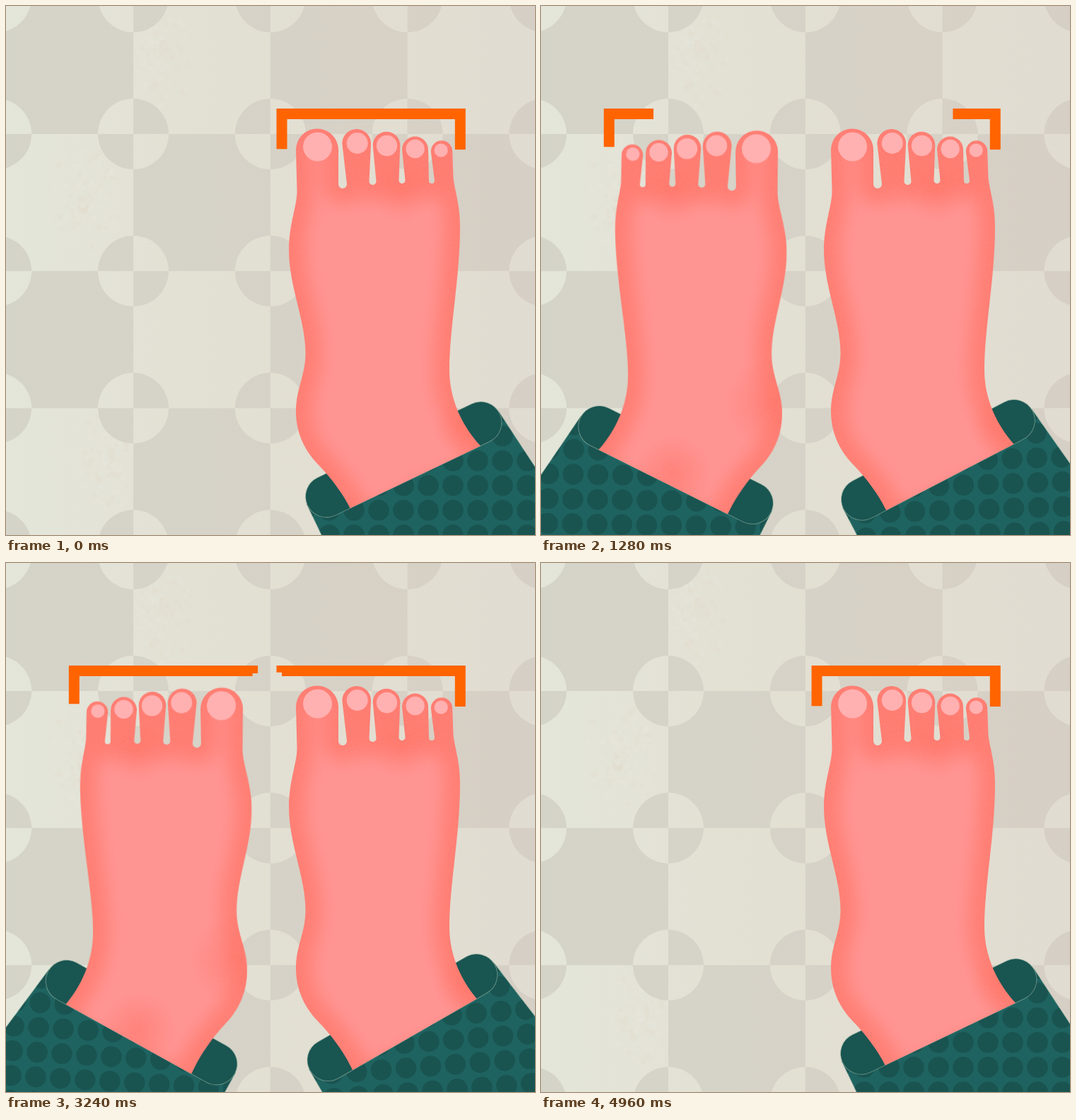
These frames come from a looping animation (748x748 px, 5 s). An HTML page with a canvas:

```html
<!DOCTYPE html>
<html lang="en">
<head>
<meta charset="utf-8">
<title>Two feet</title>
<style>
  html, body { margin: 0; width: 100%; height: 100%; overflow: hidden; background: #e2ded2; }
  canvas { display: block; }
</style>
</head>
<body>
<canvas id="stage" width="748" height="748"></canvas>
<script>
const SIZE = 748, LOOP = 5000, STEP = 40, TAU = Math.PI * 2;
const ctx = document.getElementById('stage').getContext('2d');
const rad = deg => deg * Math.PI / 180;

// Smooth progress of t from start to end, 0 to 1
const ease = (t, start, end) => {
  const u = Math.min(1, Math.max(0, (t - start) / (end - start)));
  return u * u * (3 - 2 * u);
};

let seed = 7;
const random = () => (seed = (seed * 16807) % 2147483647) / 2147483647;

function layer() {
  const canvas = document.createElement('canvas');
  canvas.width = canvas.height = SIZE;
  return canvas;
}

function disc(c, x, y, r) {
  c.beginPath();
  c.arc(x, y, r, 0, TAU);
  c.fill();
}

function makeFloor() {
  const canvas = layer(), c = canvas.getContext('2d');
  const across = colors => {
    const g = c.createLinearGradient(0, 0, SIZE, 0);
    colors.forEach((color, i) => g.addColorStop(i / (colors.length - 1), color));
    return g;
  };
  const light = across(['#e4e6da', '#e3e0d4', '#e2ded2', '#e1dcd1']);
  const dark = across(['#d5d4c8', '#d6d3c8', '#d7d1c6', '#d6cfc5']);
  const cell = 193.8, x0 = -13.8, y0 = -12.8;

  c.fillStyle = light;
  c.fillRect(0, 0, SIZE, SIZE);
  for (const [cx, cy] of [[110, 285], [215, 60], [150, 640]]) {
    for (let i = 0; i < 160; i++) {
      const a = random() * TAU, d = random() * 85;
      c.fillStyle = random() < 0.5 ? 'rgba(226,221,207,.35)' : 'rgba(229,231,219,.4)';
      disc(c, cx + Math.cos(a) * d * 0.7, cy + Math.sin(a) * d, 1 + random() * 4);
    }
  }
  c.fillStyle = dark;
  for (let i = 0; i < 4; i++) {
    for (let j = 0; j < 4; j++) {
      if ((i + j) % 2 === 1) continue;
    }
  }
  const isDark = (i, j) => (i + j) % 2 === 0;
  for (let i = 0; i < 5; i++) {
    for (let j = 0; j < 5; j++) {
      if (isDark(i, j)) c.fillRect(x0 + i * cell, y0 + j * cell, cell, cell);
    }
  }
  // Quarter discs at the corners swap the two tones
  for (let i = 0; i < 5; i++) {
    for (let j = 0; j < 5; j++) {
      const x = x0 + i * cell, y = y0 + j * cell;
      for (let q = 0; q < 4; q++) {
        const right = q === 0 || q === 3, below = q < 2;
        c.fillStyle = isDark(i + (right ? 2 : 1), j + (below ? 2 : 1)) ? light : dark;
        c.beginPath();
        c.moveTo(x, y);
        c.arc(x, y, 50, q * Math.PI / 2, (q + 1) * Math.PI / 2);
        c.fill();
      }
    }
  }
  return canvas;
}

// x, y, radius
const TOES = [[440, 203.5, 30], [495.7, 194.3, 20.4], [538, 197, 19.3], [578.5, 203, 18.5], [616, 205.5, 15.2]];
const GAPS = [[476, 252, 6], [518.5, 248, 5], [560, 246.5, 4.5], [602, 247, 4]];
const NAILS = [[440.5, 199, 20.5], [496.7, 194, 15], [538.5, 197.5, 14.7], [578.6, 202, 13.2], [615.2, 204, 9.6]];

function footPath() {
  const p = new Path2D();
  p.moveTo(411.5, 262);
  TOES.forEach(([x, y, r], i) => {
    p.arc(x, y, r, Math.PI, TAU);
    if (GAPS[i]) p.arc(...GAPS[i], Math.PI, 0, true);
  });
  p.lineTo(632.5, 243);
  p.bezierCurveTo(635, 264, 642, 280, 642, 312);
  p.bezierCurveTo(642, 385, 627, 455, 627, 515);
  p.bezierCurveTo(627, 556, 645, 594, 671, 622);
  p.lineTo(694, 645);
  p.lineTo(502, 740);
  p.lineTo(487, 711);
  p.bezierCurveTo(476, 689, 461, 669, 441, 648);
  p.bezierCurveTo(421, 627, 410, 602, 410, 573);
  p.bezierCurveTo(410, 541, 423.5, 523, 423.5, 490);
  p.bezierCurveTo(423.5, 445, 400, 396, 400, 345);
  p.bezierCurveTo(400, 309, 411.5, 283, 411.5, 262);
  p.closePath();
  return p;
}

function makeFoot(patches) {
  const canvas = layer(), c = canvas.getContext('2d');
  const shade = layer(), s = shade.getContext('2d');
  const path = footPath();

  s.filter = 'blur(13px)';
  s.strokeStyle = 'rgba(255,122,109,.86)';
  s.lineWidth = 44;
  s.stroke(path);
  s.filter = 'none';
  for (const [x, y, r, alpha] of patches) {
    const g = s.createRadialGradient(x, y, 0, x, y, r);
    g.addColorStop(0, `rgba(255,112,98,${alpha})`);
    g.addColorStop(1, 'rgba(255,112,98,0)');
    s.fillStyle = g;
    s.fillRect(x - r, y - r, 2 * r, 2 * r);
  }
  const grain = s.getImageData(0, 0, SIZE, SIZE);
  for (let i = 3; i < grain.data.length; i += 4) {
    if (grain.data[i]) grain.data[i] *= 0.82 + 0.3 * random();
  }
  s.putImageData(grain, 0, 0);

  c.fillStyle = '#ff9593';
  c.fill(path);
  c.globalCompositeOperation = 'source-atop';
  c.drawImage(shade, 0, 0);
  c.globalCompositeOperation = 'source-over';
  c.fillStyle = '#ffb0b0';
  NAILS.forEach(nail => disc(c, ...nail));
  return canvas;
}

const floor = makeFloor();
const RIGHT = { foot: makeFoot([[560, 262, 45, 0.4], [650, 595, 45, 0.4]]), dots: [18, 12], drop: 0 };
const LEFT = { foot: makeFoot([[560, 262, 45, 0.4], [428, 560, 65, 0.45], [565, 655, 55, 0.5]]), dots: [23, 26], drop: 2.5 };

const CUFF_ANGLE = rad(25.56);
const trouser = new Path2D('M-155.3-32V420H207L146.3-32Z');
const opening = new Path2D();
opening.roundRect(-155, -59, 301, 59, 29.5);

function drawLeg({ foot, dots, drop }, swing) {
  const angle = -CUFF_ANGLE - rad(4.6) * swing;
  const pivotX = 579, pivotY = 666 + drop;
  ctx.save();
  ctx.translate(pivotX, pivotY);
  ctx.rotate(angle);

  ctx.save();
  ctx.fillStyle = '#1f6360';
  ctx.fill(trouser);
  ctx.clip(trouser);
  ctx.rotate(CUFF_ANGLE);
  ctx.fillStyle = '#195451';
  for (let i = -8; i < 13; i++) {
    for (let j = -7; j < 9; j++) disc(ctx, dots[0] + 35 * i, dots[1] + 35 * j, 14.8);
  }
  ctx.restore();

  ctx.lineWidth = 1;
  ctx.strokeStyle = 'rgba(150,178,160,.6)';
  ctx.stroke(trouser);
  ctx.fillStyle = '#195551';
  ctx.fill(opening);
  ctx.stroke(opening);

  // The skin stops at the front edge of the cuff
  ctx.beginPath();
  ctx.rect(-500, -900, 1000, 900);
  ctx.clip();
  ctx.rotate(-angle);
  ctx.drawImage(foot, -pivotX, -pivotY);
  ctx.restore();
}

function drawBracket(outerX, outerY, innerX, innerY, shown) {
  const top = 152.5;
  const length = outerY - top + Math.abs(innerX - outerX) + innerY - top;
  if (shown <= 0) return;
  ctx.beginPath();
  ctx.moveTo(outerX, outerY);
  ctx.lineTo(outerX, top);
  ctx.lineTo(innerX, top);
  ctx.lineTo(innerX, innerY);
  ctx.strokeStyle = '#ff6400';
  ctx.lineWidth = 15;
  ctx.setLineDash(shown < 1 ? [length * shown, 2 * length] : []);
  ctx.stroke();
  ctx.setLineDash([]);
}

function draw(t) {
  const swing = ease(t, 0, 2920) - ease(t, 2920, LOOP);
  const shown = t < 2040 ? 1 - ease(t, 0, 2040) : ease(t, 2040, 3600);
  const leaving = ease(t, 4040, LOOP);
  const away = 1 - ease(t, 0, 600) + leaving;
  const hop = leaving < 0.69 ? 17 * Math.sin(Math.PI * leaving / 0.69) ** 2 : 0;

  ctx.drawImage(floor, 0, 0);
  drawLeg(RIGHT, swing);
  drawBracket(642.3, 203, 390, 202.3, shown);

  ctx.save();
  ctx.translate(-360 * away, -hop);
  ctx.save();
  ctx.translate(305, 202.7);
  ctx.rotate(rad(-0.9));
  ctx.scale(-1, 1);
  ctx.translate(-440, -200);
  drawLeg(LEFT, swing);
  ctx.restore();
  drawBracket(96.3, 199.2, 348.6, 203.2, shown);
  ctx.restore();
}

const began = performance.now();
function frame() {
  const t = (performance.now() - began) % LOOP;
  draw(Math.floor(t / STEP) * STEP);
  requestAnimationFrame(frame);
}
frame();
</script>
</body>
</html>
```
